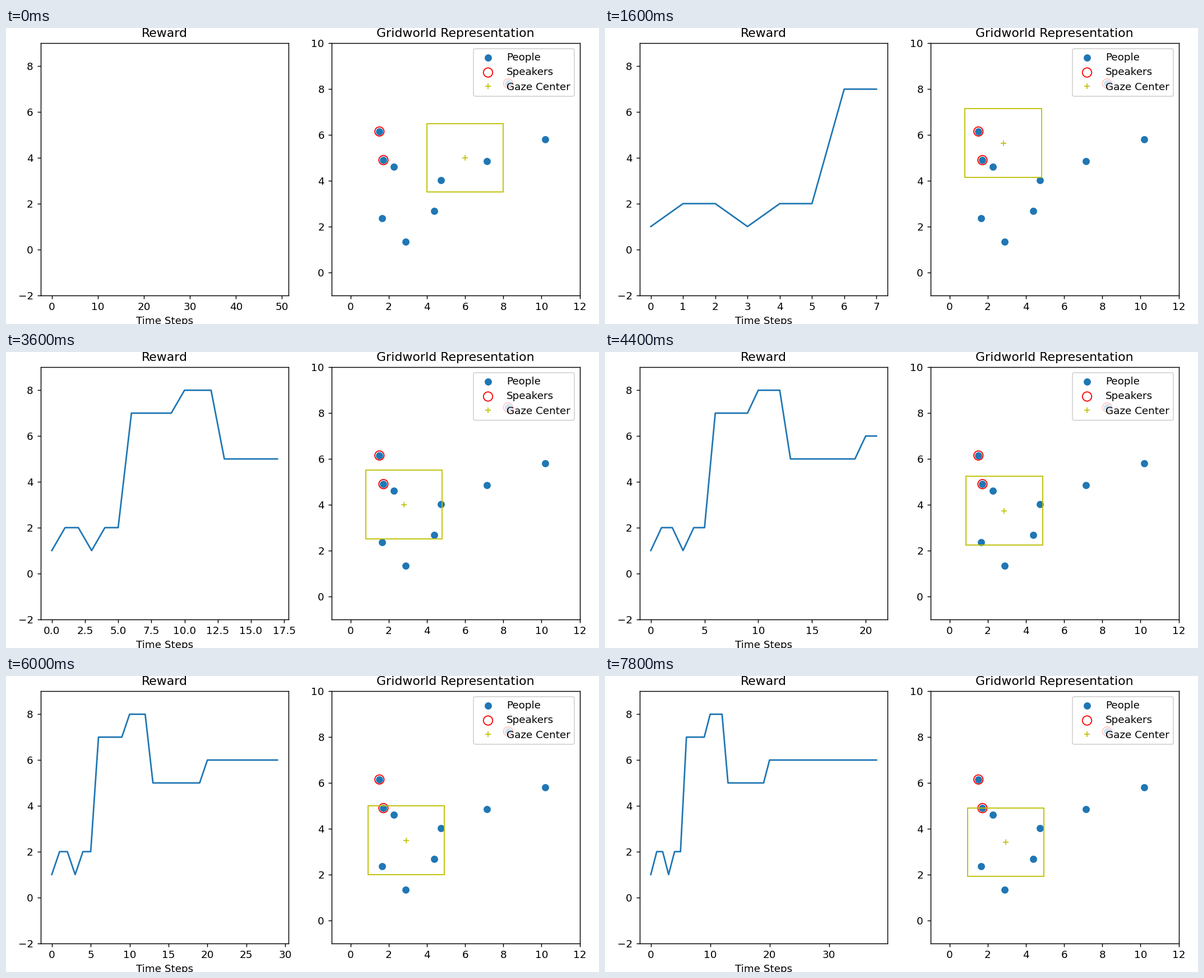
Recreate the animation shown at these times as a matplotlib script. Size 1058x529 px, loop 8000 ms.

```python
import numpy as np
import matplotlib.pyplot as plt
from matplotlib.animation import FuncAnimation
from matplotlib.patches import Rectangle

W, H, DPI = 1058, 529, 132.25
FRAMES, INTERVAL = 40, 200
BOX = np.array([4, 3])

SPEAKERS = [(1.51, 6.15), (1.72, 4.90), (8.25, 8.25)]
LISTENERS = [(2.28, 4.61), (4.73, 4.02), (4.37, 2.68), (1.65, 2.37),
             (2.88, 1.34), (7.14, 4.85), (10.19, 5.80)]

# reward changes as people enter and leave the gaze box
JUMPS = {0: 1, 1: 1, 3: -1, 4: 1, 6: 5, 10: 1, 13: -3, 20: 1}

# the gaze sweeps along a smooth curve, then settles exponentially
SWEEP_STEPS = [0, 6, 8, 10.5, 13]
SWEEP = np.array([(6, 5), (3.42, 5.86), (2.81, 5.64), (2.6, 5.14), (2.65, 4.64)])
REST = np.array([2.95, 3.38])
DECAY = 0.87
curve_coeffs = np.polyfit(SWEEP_STEPS, SWEEP, 4)


def gaze(step):
    end = SWEEP_STEPS[-1]
    if step < end:
        return np.array([np.polyval(c, step) for c in curve_coeffs.T])
    return REST + (SWEEP[-1] - REST) * DECAY ** (step - end)


def reward(step):
    return sum(change for start, change in JUMPS.items() if start <= step)


def add_axes(left, right, title):
    top, bottom = 27.4, 477.6
    ax = fig.add_axes([left / W, 1 - bottom / H, (right - left) / W, (bottom - top) / H])
    ax.set_title(title)
    return ax


fig = plt.figure(figsize=(W / DPI, H / DPI), dpi=DPI, facecolor="white")

ax_reward = add_axes(61.6, 504.4, "Reward")
ax_reward.set_xlabel("Time Steps", labelpad=3.7)
ax_reward.set_ylim(-2, 9)
curve, = ax_reward.plot([], [], color="C0", lw=1.5)

ax_grid = add_axes(580.8, 1023.5, "Gridworld Representation")
ax_grid.scatter(*zip(*SPEAKERS, *LISTENERS), s=36, lw=1, color="C0", label="People")
ax_grid.scatter(*zip(*SPEAKERS), s=80, lw=1, facecolors="none", edgecolors="r",
                label="Speakers")
center, = ax_grid.plot([], [], "y+", ms=5.5, mew=0.9, label="Gaze Center")
box = ax_grid.add_patch(Rectangle((0, 0), *BOX, fill=False, ec="y", lw=1))
ax_grid.set_xlim(-1, 12)
ax_grid.set_ylim(-1, 10)
ax_grid.legend(loc="upper right", labelspacing=0.46)


def update(step):
    curve.set_data(range(step), [reward(i) for i in range(step)])
    # an empty plot spans 50 steps, a single point a narrow band around it
    last = (step or 50) - 1
    pad = 0.05 * last or 0.055
    ax_reward.set_xlim(-pad, last + pad)

    pos = gaze(step)
    center.set_data(pos[:1], pos[1:])
    box.set_xy(pos - BOX / 2)
    return curve, center, box


anim = FuncAnimation(fig, update, frames=FRAMES, init_func=lambda: update(0),
                     interval=INTERVAL, repeat=True, repeat_delay=0, blit=False)
plt.show()
```
